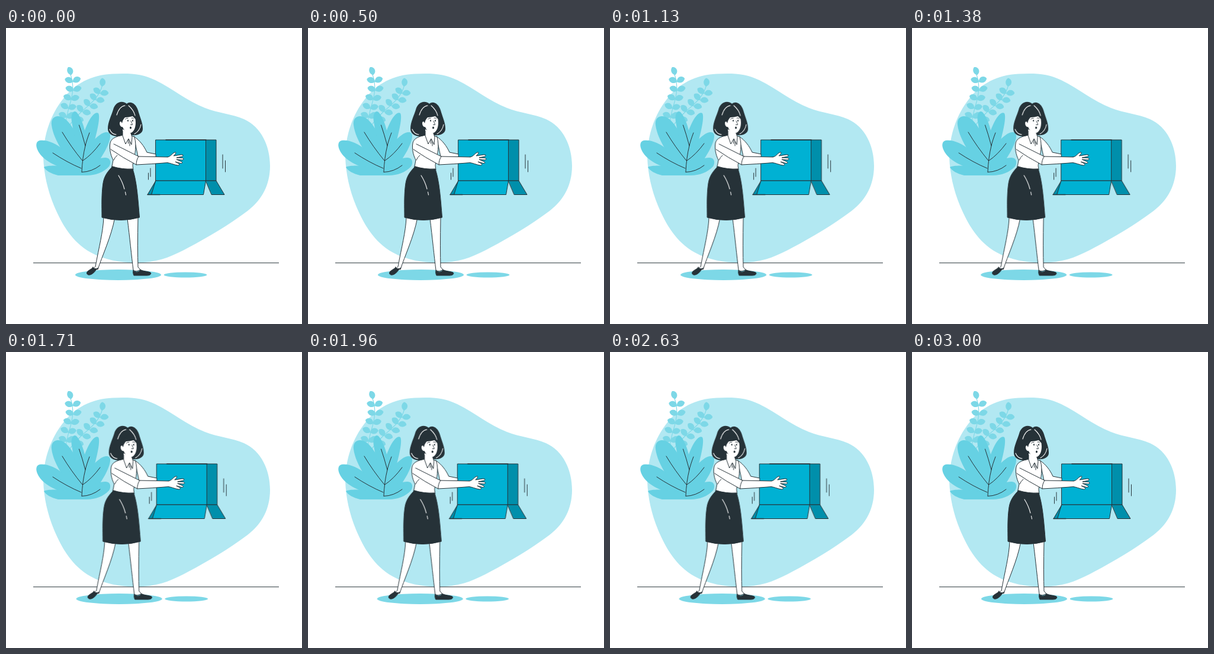
These frames come from a looping animation (500x500 px, 3.04 s). An HTML page without scripts:

```html
<!DOCTYPE html>
<html lang="en">
<head>
<meta charset="utf-8">
<title>Woman shaking an empty box</title>
<style>
html, body { margin: 0; width: 100%; height: 100%; overflow: hidden; background: #fff; }
svg { display: block; width: 100vw; height: 100vh; }
.ink { fill: none; stroke: #263238; stroke-width: 1; stroke-linecap: round; stroke-linejoin: round; }
.skin { fill: #fff; }
.dark { fill: #263238; }
.shine { fill: none; stroke: #fff; stroke-width: 1.1; stroke-linecap: round; }
.leaf { fill: #66d1e3; }
.sprig { fill: #7dd8e7; }
.stem { fill: none; stroke: #7dd8e7; stroke-width: 1.1; }
.front { fill: #00b1d3; }
.side { fill: #008fab; }
#shake { animation: shake 3040ms linear infinite; }
/* 3 s shake, then a 40 ms rest */
@keyframes shake {
  0%, 98.684%, 100% { transform: translateX(0); }
  9.868%, 88.816% { transform: translateX(-1px); }
  19.737%, 78.947% { transform: translateX(2px); }
  29.605%, 49.342%, 69.079% { transform: translateX(-4px); }
  39.474%, 59.211% { transform: translateX(4px); }
}
</style>
</head>
<body>
<svg viewBox="0 0 500 500">
  <defs>
    <path id="drop" d="M0 0C-7-2-8.500-9-5-13.500C2-14.500 7-6 0 0Z"/>
    <g id="pair">
      <use href="#drop" transform="rotate(-52)"/>
      <use href="#drop" transform="scale(-1 1) rotate(-46)"/>
    </g>
  </defs>

  <path fill="#b2e8f2" d="M180 77.500C208 76 230 77 252 88C284 104 304 122 336 135C358 144 382 145 402 154C431 167 446 199 446 233C446 264 433 290 408 309C376 333 342 353 308 371C284 384 262 394 232 396C204 398 170 394 143 379C112 362 94 331 81 300C70 273 64 247 63 218C63 181 76 145 97 119C115 95 144 79 180 77.500Z"/>

  <g class="sprig">
    <path class="stem" d="M108 76C116 96 113 114 106 135Q102 150 100 166"/>
    <use href="#drop" transform="translate(110 79.500)"/>
    <use href="#pair" transform="translate(113 91)"/>
    <use href="#pair" transform="translate(114 106) rotate(3)"/>
    <use href="#pair" transform="translate(110 121) rotate(8)"/>
    <use href="#pair" transform="translate(105 136) rotate(10)"/>
    <use href="#pair" transform="translate(102 151) rotate(9)"/>
    <path class="stem" d="M163 96C158 116 143 128 130 139Q115 153 106 166"/>
    <use href="#drop" transform="translate(162 99) rotate(22)"/>
    <use href="#pair" transform="translate(159 111) rotate(20)"/>
    <use href="#pair" transform="translate(152 122) rotate(28)"/>
    <use href="#pair" transform="translate(141 132) rotate(32)"/>
    <use href="#pair" transform="translate(129 142) rotate(34)"/>
    <use href="#pair" transform="translate(117 154) rotate(34)"/>
  </g>

  <g class="leaf">
    <path d="M126 244C105 225 80 190 77 164C75 149 88 145 99 153C119 168 130 207 131 244Z"/>
    <path d="M127 243C124 214 115 184 111 158C109 145 114 138 119 142C129 153 137 180 136 200Z"/>
    <path d="M127 243C123 213 127 183 138 161C144 149 151 141 156 144C160 151 153 179 147 200C144 218 136 232 127 243Z"/>
    <path d="M127 243C128 217 142 192 158 181C166 175 175 174 176 181C177 193 163 218 150 233Q139 242 127 243Z"/>
    <path d="M127 243C130 231 149 220 168 219C177 219 178 228 174 234C165 244 150 249 137 249L105 249Z"/>
    <path d="M127 243C104 241 75 232 60 216C50 205 48 192 57 190C80 187 113 213 127 243Z"/>
    <path d="M137 249H88C76 246 67 241 64 235C75 230 110 233 132 241Z"/>
  </g>
  <path class="ink" d="M95 176Q110 201 129 224M79 211Q103 227 127 237M123.500 164Q129 180 134 199M141 177Q136 190 134 199Q129 219 128 243M159 195Q145 214 130 224M159 232Q145 243 128 243.500"/>
  <path fill="none" stroke="#263238" d="M46 396.800H461"/>

  <g id="shake">
    <g class="sprig">
      <ellipse cx="189.500" cy="417" rx="72.500" ry="9"/>
      <ellipse cx="303" cy="417" rx="36.300" ry="4.500"/>
    </g>

    <g class="ink">
      <path class="skin" d="M165 320C164 345 157 370 151 403L148 406L155 408C162 386 178 352 183.500 322Z"/>
      <path class="skin" d="M205 322C209 354 212 385 215 409Q220 413 227 408L223 404Q222 374 223 320Z"/>
      <path class="dark" d="M147 404C145 408 137 409 136.500 414C137 418 142 418 146 415C151 412 151 408 156 405C152 408 149 407 147 404Z"/>
      <path class="dark" d="M215 409.500C214 412 215 416 216 418H238C244 418 246 415 244 413C240 411 232 411 227 408.500C225 413 218 413.500 215 409.500Z"/>
    </g>

    <g class="ink">
      <path class="side" d="M337.500 189H355V258H337.500Z"/>
      <path class="front" d="M253 189H337.500V258H253Z"/>
      <path class="side" d="M253 258L239 281.500H248Z"/>
      <path class="front" d="M253 258H337.500L333.500 281.500H246Z"/>
      <path class="side" d="M337.500 258H355L369 281.500H347.500Z"/>
      <path stroke-width="1.400" d="M270 189H338M239 281.500H260"/>
      <path d="M240.500 245V256M244 237V251M366 214V237M370.500 224V243"/>
    </g>

    <g class="ink">
      <path class="skin" d="M216 183C226 190 233 199 238 210L253 213V220H224Z"/>
      <path class="skin" d="M196 181C185 184 176 186 175.500 198C175 209 178 217 181 223Q180 230 178 237L215 240Q213 232 215 225C218 213 221 199 217 184L210 181Z"/>
      <path class="dark" d="M180 234Q196 239 214 238C221 259 223 289 225.500 320Q194 329 162 320C162 301 161 281 164 262C166 249 173 241 180 234Z"/>
    </g>
    <path class="shine" d="M190 249Q197 260 200 272M201.500 277L202.500 282"/>

    <path class="dark" d="M204 128C195 121 184 126 181 138C178 148 172 159 172 170C172 181 185 186 198 181H213C223 182 232 178 231 169C231 160 226 150 223 139C220 128 210 122 204 128Z"/>
    <g class="ink">
      <path class="skin" d="M197 171V181C199 186 202 191 207 194Q211 190 211 184V178Z" stroke="none"/>
      <path class="skin" d="M197 174V182L202 196L207 187L212 197L213 184L211 178"/>
      <path d="M207 188L206.500 195M209 192L209 199"/>
      <path class="skin" stroke="none" d="M203 145C199 149 197 154 196 159C192 156 191 161 193 165Q195 168 197 167C199 173 204 178 209 177.500C216 177 219 168 219 160C219 154 218 149 214 144Z"/>
      <path class="dark" stroke="none" d="M194 157C196 148 200 143 207 138L217 139L222 156Q217 153 214 149Q207 151 201 151Q197 155 196 161Z"/>
      <path d="M201.500 154Q203.500 151.500 206 152.500M212 152Q214.500 151 216 153.500M211 157Q213 161 213.500 163.500L210.500 163.500" stroke-width=".9"/>
    </g>
    <g class="dark">
      <ellipse cx="206" cy="156.500" rx="1" ry="1.600"/>
      <ellipse cx="214" cy="156.500" rx="1" ry="1.600"/>
      <ellipse cx="210.500" cy="168.500" rx="1.500" ry="2.100"/>
    </g>
    <path class="shine" d="M187 147C190 137 194 132 201 131M175 171Q178 179 186 180M207 131Q216 139 218 148M228 163Q226 174 217 179"/>

    <g class="ink">
      <path class="skin" d="M272 218C278 218 280 212 285 210Q288 209 286 213L283 216L296 214Q301 214 298 217L288 219L298 219.500Q302 221 298 223L288 222L297 226Q299 229 295 228.500L286 226L292 229Q294 232 290 232C283 231 278 228 272 227.500Z"/>
      <path class="skin" stroke="none" d="M178 191C176 200 177 206 183 210L220 231L273 227.500V218L224 217L188 197Z"/>
      <path d="M182 196L224 217L273 218M177 205Q197 219 220 231Q245 230 273 227.500M224 217Q220 223 220 231M182 223Q184 218 188 215"/>
    </g>
  </g>
</svg>
</body>
</html>
```
